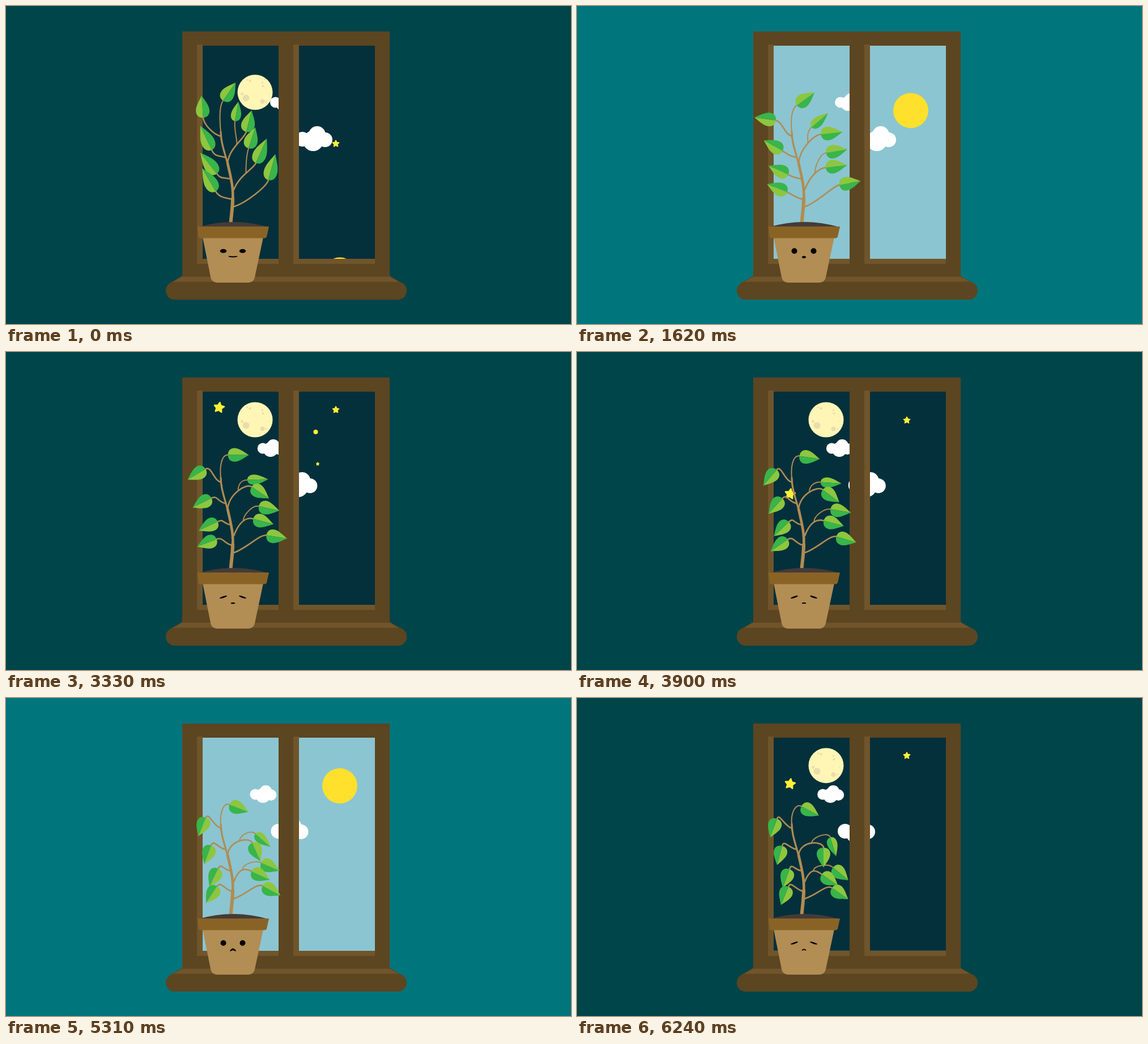
An HTML page with a canvas that plays this animation: 997 px wide and 561 px high, repeating every 6270 ms.

```html
<!DOCTYPE html>
<html lang="en">
<head>
<meta charset="utf-8">
<title>Plant on a window sill</title>
<style>
html, body { margin: 0; width: 100%; height: 100%; overflow: hidden; background: #00454a; }
canvas { display: block; }
</style>
</head>
<body>
<canvas id="stage" width="997" height="561"></canvas>
<script>
const ctx = document.getElementById('stage').getContext('2d');
const LOOP = 6270;
const DAWN = [0, 4060], DUSK = [1620, 5670];
const WOOD = '#5c4521', WOOD_LIGHT = '#70552b', STEM = '#b18c52', YELLOW = '#fff037';

const clamp = x => Math.max(0, Math.min(1, x));
const mix = (a, b, k) => a + (b - a) * k;
const inOut = x => (x = clamp(x)) < .5 ? 4 * x ** 3 : 1 - 4 * (1 - x) ** 3;
const fall = x => clamp(x) ** 2;
const overshoot = x => { const u = clamp(x) - 1; return 1 + 1.5 * u ** 3 + .5 * u * u; };
const total = (starts, f) => starts.reduce((sum, s) => sum + f(s), 0);

// Linear interpolation of values over matching times.
function track(t, times, values) {
  let i = 1;
  while (i < times.length - 1 && t > times[i]) i++;
  return mix(values[i - 1], values[i], clamp((t - times[i - 1]) / (times[i] - times[i - 1])));
}

// How far a body has climbed: 0 below the window, 1 at rest.
function lift(t, first, ups, upDelay, upTime, downs, downDelay) {
  return first + total(ups, s => overshoot((t - s - upDelay) / upTime))
    - total(downs, s => fall((t - s - downDelay) / 400));
}

function poly(color, ...p) {
  ctx.fillStyle = color;
  ctx.beginPath();
  for (let i = 0; i < p.length; i += 2) ctx.lineTo(p[i], p[i + 1]);
  ctx.fill();
}
function rect(color, x, y, w, h) {
  ctx.fillStyle = color;
  ctx.fillRect(x, y, w, h);
}
function oval(color, x, y, rx, ry = rx, turn = 0) {
  ctx.fillStyle = color;
  ctx.beginPath();
  ctx.ellipse(x, y, rx, ry, turn, 0, 7);
  ctx.fill();
}
function curve(width, x, y, ...p) {
  ctx.strokeStyle = STEM;
  ctx.lineWidth = width;
  ctx.lineCap = 'round';
  ctx.beginPath();
  ctx.moveTo(x, y);
  ctx.bezierCurveTo(...p);
  ctx.stroke();
}
function star(x, y, r, turn = 0) {
  ctx.fillStyle = ctx.strokeStyle = YELLOW;
  ctx.lineWidth = r * .25;
  ctx.lineJoin = 'round';
  ctx.beginPath();
  for (let i = 0; i < 10; i++) {
    const a = i * Math.PI / 5 + turn, d = r * (i % 2 ? .45 : .9);
    ctx.lineTo(x + d * Math.sin(a), y - d * Math.cos(a));
  }
  ctx.closePath();
  ctx.fill();
  ctx.stroke();
}

function drawMoon(x, y) {
  oval('#fff6b6', x, y, 31);
  const crater = (dx, dy, r) => oval('#e8deab', x + dx, y + dy, r);
  crater(-16, 10, 6);
  crater(13, 16, 4);
  crater(-9, -20, 2.3);
  crater(-14, -22, 1.5);
  crater(13, -17, 1.7);
  crater(14, -11, 2);
  crater(-23, 3, 2.4);
  crater(24, 3, 1);
  crater(20, 16, 1.4);
}

function drawSky(t, day) {
  ctx.save();
  ctx.beginPath();
  ctx.rect(347, 70, 134, 376);
  ctx.rect(517, 70, 134, 376);
  ctx.clip();
  rect('#04303b', 347, 70, 304, 376);
  rect('#8bc5d1', 347, 446 - 376 * day, 304, 376);

  const drop = (upDelay, upTime, downDelay) => 358 * (1 - lift(t, 1, DUSK, upDelay, upTime, DAWN, downDelay));
  star(376, 98 + drop(350, 560, -420), 10, .15);
  star(582, 102 + drop(20, 820, -250), 6.5);
  const twinkle = Math.sin(Math.PI * clamp((t - 3180) / 300));
  if (twinkle > .01) {
    oval(YELLOW, 546.5, 141, 4 * twinkle);
    star(550, 197.5, 3.5 * twinkle);
  }
  drawMoon(439.5, 119.5 + drop(20, 820, -120));
  oval('#ffe02c', 589, 155 + 322 * (1 - lift(t, 0, DAWN, 0, 470, DUSK, -120)), 31);

  const big = 576 - .008 * t, small = 466 - .0067 * t;
  const puff = (x, y, r) => oval('#fff', x, y, r);
  puff(big - 13, 236, 13);
  puff(big - 27, 227, 15);
  puff(big - 34, 238, 18);
  puff(big - 53, 235, 13);
  puff(small + 9.5, 170, 9.5);
  puff(small + 28, 165, 11);
  puff(small + 23, 172, 13);
  puff(small + 37, 171, 10);
  ctx.restore();
}

function drawWindow() {
  // The panes stay open so the sky shows through.
  rect(WOOD, 311, 45, 366, 25);
  rect(WOOD, 311, 446, 366, 33);
  for (const x of [311, 481, 651]) rect(WOOD, x, 68, x > 600 ? 26 : 36, 380);
  for (const x of [337, 507]) {
    rect(WOOD_LIGHT, x, 68, 10, 387);
    rect(WOOD_LIGHT, x, 446, 144, 9);
  }
  poly(WOOD, 311, 476, 677, 476, 699, 489, 289, 489);
  poly(WOOD_LIGHT, 311, 477.5, 677, 477.5, 694, 487, 294, 487);
  ctx.fillStyle = WOOD;
  ctx.beginPath();
  ctx.roundRect(282, 486.5, 425, 31.5, 15.5);
  ctx.fill();
}

const TURN_TIMES = [0, 720, 2250, 4350, 6240];
const BASE_TIMES = [0, 2250, 6240];
// base x, base y, angles from upright
const LEAVES = [
  [[348, 352, 353], [197, 204, 213], [-4, -78, -84, -155, -160]],
  [[383, 390, 396], [167, 178, 191], [35, 25, 75, 105, 118]],
  [[404, 418, 447], [203, 218, 246], [10, 8, 78, 98, 163]],
  [[424, 433, 435], [222, 228, 264], [14, 35, 118, 130, 180]],
  [[428, 444, 452], [251, 262, 299], [18, 42, 108, 97, 130]],
  [[441, 438, 432], [277, 288, 311], [24, 52, 105, 105, 125]],
  [[463, 463, 450], [307, 319, 335], [15, 72, 85, 112, 125]],
  [[363, 362], [254, 261], [-25, -38, -76, -155, -165]],
  [[372, 375], [296, 302], [-38, -45, -80, -148, -160]],
  [[370, 373], [327, 333], [-30, -42, -86, -135, -158]]
];

function drawLeaf({ a, width, x, y, len }) {
  ctx.save();
  ctx.translate(x, y);
  ctx.rotate(a);
  for (const side of [-1, 1]) {
    const w = side * width / 2;
    ctx.fillStyle = side < 0 ? '#8dc63f' : '#39b54a';
    ctx.beginPath();
    ctx.moveTo(0, -len);
    ctx.bezierCurveTo(w * .3, -len * .82, w, -len * .55, w, -len * .32);
    ctx.bezierCurveTo(w, -len * .1, w * .55, 0, 0, 0);
    ctx.fill();
  }
  ctx.restore();
}

function drawPlant(t) {
  const leaves = LEAVES.map(([xs, ys, turns], i) => {
    const times = xs.length > 2 ? BASE_TIMES : [0, LOOP];
    return {
      a: track(t, TURN_TIMES, turns) * Math.PI / 180,
      x: track(t, times, xs), y: track(t, times, ys),
      width: i === 2 ? 18 : 24,
      len: track(t, [0, 720, LOOP], [i === 2 ? 35 : i > 4 ? 47.5 : 39, 39, 35])
    };
  });
  const behind = (l, d) => [l.x - d * Math.sin(l.a), l.y + d * Math.cos(l.a)];

  // Stem from a joint to a leaf; returns its middle, where a twig may fork off.
  function branch(i, x, y, dx = -14, dy = -3, width = 2.6) {
    const l = leaves[i], [bx, by] = behind(l, 12);
    curve(width, x, y, x + dx, y + dy, bx, by, l.x, l.y);
    return [(4 * x + 3 * dx + 3 * bx + l.x) / 8, (4 * y + 3 * dy + 3 * by + l.y) / 8];
  }
  curve(6, 396.5, 383, 398, 365, 400, 355, 400, 340);
  curve(4.6, 400, 345, 402, 320, 396, 300, 391, 277);
  curve(3.2, 391, 278, 385, 255, 379, 240, 379, 222);
  branch(0, 380, 230);
  branch(1, 379, 223, -2, -20, 2);
  branch(2, ...branch(3, 391, 277, 3, -27), 0, -10, 1.9);
  branch(4, ...branch(5, 402, 324, 10, -26), 0, -10, 1.9);
  branch(6, 402, 354, 22, -7);
  branch(7, 387, 267);
  branch(8, 396, 305);
  branch(9, 399, 341);
  leaves.forEach(drawLeaf);
}

function drawPot(t) {
  ctx.fillStyle = '#453b37';
  ctx.beginPath();
  ctx.moveTo(339, 390);
  ctx.quadraticCurveTo(401, 372, 463, 390);
  ctx.fill();

  ctx.fillStyle = '#b28d54';
  ctx.beginPath();
  ctx.moveTo(347, 408);
  ctx.lineTo(454, 408);
  ctx.arcTo(437, 488, 420, 488, 11);
  ctx.arcTo(363, 488, 347, 408, 11);
  ctx.fill();

  ctx.fillStyle = '#896326';
  ctx.beginPath();
  ctx.moveTo(338, 389);
  ctx.lineTo(464, 389);
  ctx.arcTo(459.5, 409.5, 440, 409.5, 4);
  ctx.arcTo(340, 409.5, 338, 389, 4);
  ctx.fill();
}

function drawFace(t) {
  const open = t < 1000 ? mix(.6, 1, clamp(t / 300))
    : 1 - total(DUSK, s => inOut((t - s - 100) / 250)) + inOut((t - 4060) / 250);
  const slant = t < 1000 ? 0 : .32 * (1 - open);
  const rx = mix(6.8, 5, open), ry = mix(1.4, 5, open);
  oval('#000', 383.5, 432.3, rx, ry, -slant);
  oval('#000', 417.5, 432.3, rx, ry, slant);

  const mouth = (...v) => track(t, [0, 720, 2250, 4350, 5310, 6240], v);
  const w = mouth(7, 3, 3, 3, 4.5, 3);
  const top = mouth(-1, 6, .8, 1.5, 7, 3);
  const bottom = mouth(2, 6, .8, 0, -3, -2);
  const y = mouth(441.7, 443, 443, 443.3, 446, 444.8);
  ctx.fillStyle = ctx.strokeStyle = '#000';
  ctx.lineWidth = 1.6;
  ctx.lineJoin = 'round';
  ctx.beginPath();
  ctx.moveTo(400.5 - w, y);
  ctx.quadraticCurveTo(400.5, y - top, 400.5 + w, y);
  ctx.quadraticCurveTo(400.5, y + bottom, 400.5 - w, y);
  ctx.closePath();
  ctx.fill();
  ctx.stroke();
}

function draw(t) {
  const day = total(DAWN, s => inOut((t - s) / 600)) - total(DUSK, s => inOut((t - s) / 600));
  rect(`rgb(0, ${mix(69, 117, day)}, ${mix(74, 124, day)})`, 0, 0, 997, 561);
  drawSky(t, day);
  drawWindow();
  drawPlant(t);
  drawPot(t);
  drawFace(t);
}

const start = performance.now();
function tick() {
  draw((performance.now() - start) % LOOP);
  requestAnimationFrame(tick);
}
tick();
</script>
</body>
</html>
```
